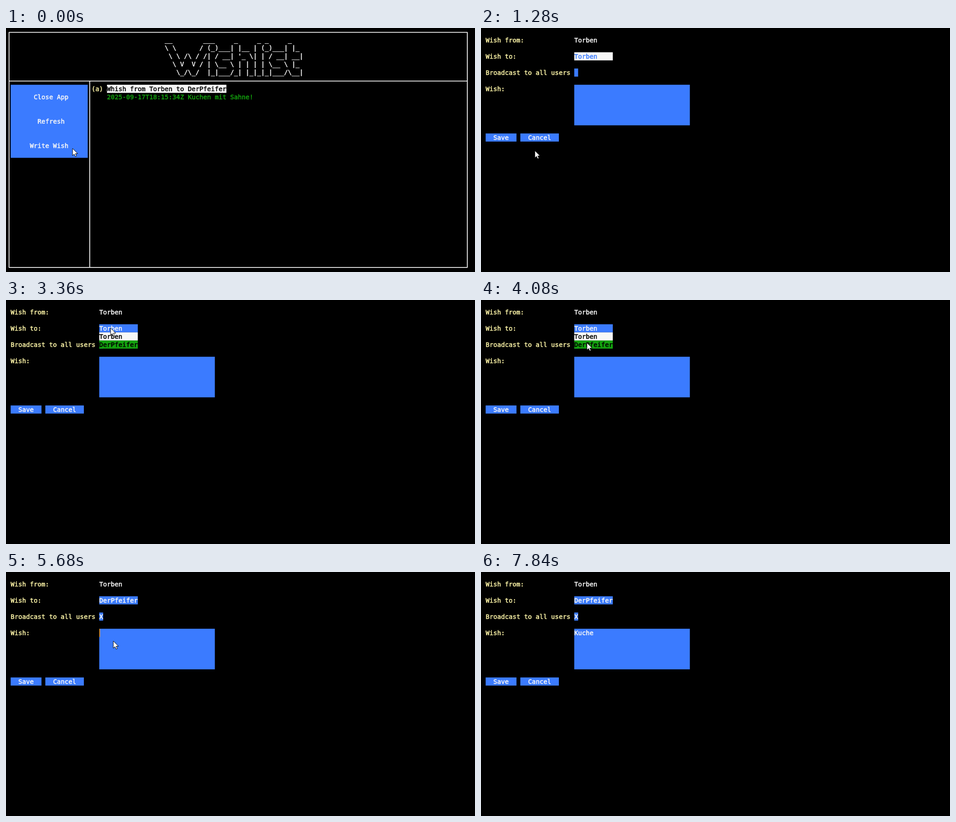
An HTML page with a canvas that plays this animation: 1036x541 px, repeating every 8000 ms.

```html
<!DOCTYPE html>
<html lang="en">
<head>
<meta charset="utf-8">
<title>Wish terminal</title>
<style>
html, body { margin: 0; width: 100%; height: 100%; overflow: hidden; background: #000; }
canvas { display: block; }
</style>
</head>
<body>
<canvas id="stage" width="1036" height="541"></canvas>
<script>
const ctx = document.getElementById('stage').getContext('2d');
const LOOP = 8000, TICK = 80;
const LEFT = 10.3, COL = 8.51, ROW = 18;
const BLACK = '#000', WHITE = '#f7f7f7', BLUE = '#3b7bff', YELLOW = '#f9f1a5', GREEN = '#13a10e', ORANGE = '#d08a30';
const ME = 'Torben', FRIEND = 'DerPfeifer';

// Moments of the story in ms
const FORM = 1280, OPEN = 3280, PICK = 4400, CHECK = 5040, FOCUS = 5520, HIDE = 6400;
const KEYS = [6400, 7280, 7440, 7600, 7760];
const CARET = [[FOCUS, 5840], [6400, 6720], [7280, 7760]];

// Pointer path: time, x, y
const PATH = [
  [0, 147, 267], [240, 147, 267], [400, 140, 268], [640, 128, 270], [880, 122, 271],
  [1120, 119, 272], [1520, 119, 272], [1840, 152, 210], [2320, 200, 109], [2560, 203, 103],
  [2720, 206, 98], [3040, 229, 66], [3200, 231, 62], [3440, 231, 62], [3680, 234, 94],
  [4480, 234, 96], [4640, 213, 96], [5200, 213, 96], [5440, 235, 148], [5600, 237, 153]
];

const BANNER = String.raw`__        ___     _     _ _     _
\ \      / (_)___| |__ | (_)___| |_
 \ \ /\ / /| / __| '_ \| | / __| __|
  \ V  V / | \__ \ | | | | \__ \ |_
   \_/\_/  |_|___/_| |_|_|_|___/\__|`.split('\n');

const colX = col => LEFT + col * COL;

function box(col, row, cols, rows, color) {
  ctx.fillStyle = color;
  ctx.fillRect(colX(col), row * ROW - 0.2, cols * COL, rows * ROW);
}

// A thin outline of the same colour gives the semibold terminal weight
function text(str, col, row, color, lift = 0) {
  const x = colX(col), y = row * ROW + 14 - lift;
  ctx.fillStyle = ctx.strokeStyle = color;
  ctx.lineWidth = 0.55;
  ctx.fillText(str, x, y);
  ctx.strokeText(str, x, y);
}

function field(str, col, row, cols, back, color, pad = 0) {
  box(col, row, cols, 1, back);
  text(str, col + pad, row, color);
}

function drawBorders() {
  ctx.strokeStyle = WHITE;
  ctx.lineWidth = 1.8;
  ctx.beginPath();
  ctx.rect(6.7, 9.6, 1012.3, 521.2);
  ctx.moveTo(6.7, 117.6);
  ctx.lineTo(1019, 117.6);
  ctx.moveTo(185, 117.6);
  ctx.lineTo(185, 530.8);
  ctx.stroke();
}

function drawList() {
  drawBorders();
  BANNER.forEach((line, i) => text(line, 40, i + 1, WHITE, 1.5));

  box(0, 7, 20, 9, BLUE);
  text('Close App', 6, 8, WHITE);
  text('Refresh', 7, 11, WHITE);
  text('Write Wish', 5, 14, WHITE);

  text('(a)', 21, 7, YELLOW);
  field(`Whish from ${ME} to ${FRIEND}`, 25, 7, 31, WHITE, BLACK);
  text('2025-09-17T18:15:34Z Kuchen mit Sahne!', 25, 8, GREEN);
}

function drawForm(t) {
  const open = t >= OPEN && t < PICK;
  const checked = t >= CHECK;
  const toggle = (str, row, cols, focused) =>
    field(str, 23, row, cols, focused ? WHITE : BLUE, focused ? BLUE : WHITE);

  text('Wish from:', 0, 1, YELLOW);
  text('Wish to:', 0, 3, YELLOW);
  text('Broadcast to all users', 0, 5, YELLOW);
  text('Wish:', 0, 7, YELLOW);

  text(ME, 23, 1, WHITE);
  toggle(t < PICK ? ME : FRIEND, 3, 10, !open && !checked);
  toggle(checked ? 'X' : '', 5, 1, checked && t < FOCUS);
  if (open) {
    field(ME, 23, 4, 10, WHITE, BLACK);
    field(FRIEND, 23, 5, 10, GREEN, BLACK);
  }

  const typed = KEYS.filter(k => t >= k).length;
  box(23, 7, 30, 5, BLUE);
  text('Kuche'.slice(0, typed), 23, 7, WHITE);
  if (CARET.some(([from, to]) => t >= from && t < to)) {
    ctx.fillStyle = ORANGE;
    ctx.fillRect(Math.round(colX(23 + typed)), 126, 2, ROW);
  }

  field('Save', 0, 13, 8, BLUE, WHITE, 2);
  field('Cancel', 9, 13, 10, BLUE, WHITE, 2);
}

function pointerAt(t) {
  const i = PATH.findIndex(p => p[0] > t);
  if (i < 0) return PATH[PATH.length - 1].slice(1);
  const [t0, x0, y0] = PATH[i - 1], [t1, x1, y1] = PATH[i];
  const k = (t - t0) / (t1 - t0);
  return [Math.round(x0 + (x1 - x0) * k), Math.round(y0 + (y1 - y0) * k)];
}

const ARROW = new Path2D('M0 0V16L3.7 12.6L6.2 18L8.8 17L6.4 11.6H11.4Z');

function drawPointer(t) {
  ctx.save();
  ctx.translate(...pointerAt(t));
  ctx.fillStyle = '#fff';
  ctx.strokeStyle = BLACK;
  ctx.lineWidth = 1;
  ctx.fill(ARROW);
  ctx.stroke(ARROW);
  ctx.restore();
}

function frame(now) {
  const t = Math.floor(now % LOOP / TICK) * TICK;
  ctx.fillStyle = BLACK;
  ctx.fillRect(0, 0, 1036, 541);
  ctx.font = '14.13px "DejaVu Sans Mono", monospace';
  ctx.lineJoin = 'round';
  if (t < FORM) drawList(); else drawForm(t);
  ctx.lineJoin = 'miter';
  if (t < HIDE) drawPointer(t);
  requestAnimationFrame(frame);
}

requestAnimationFrame(frame);
</script>
</body>
</html>
```
